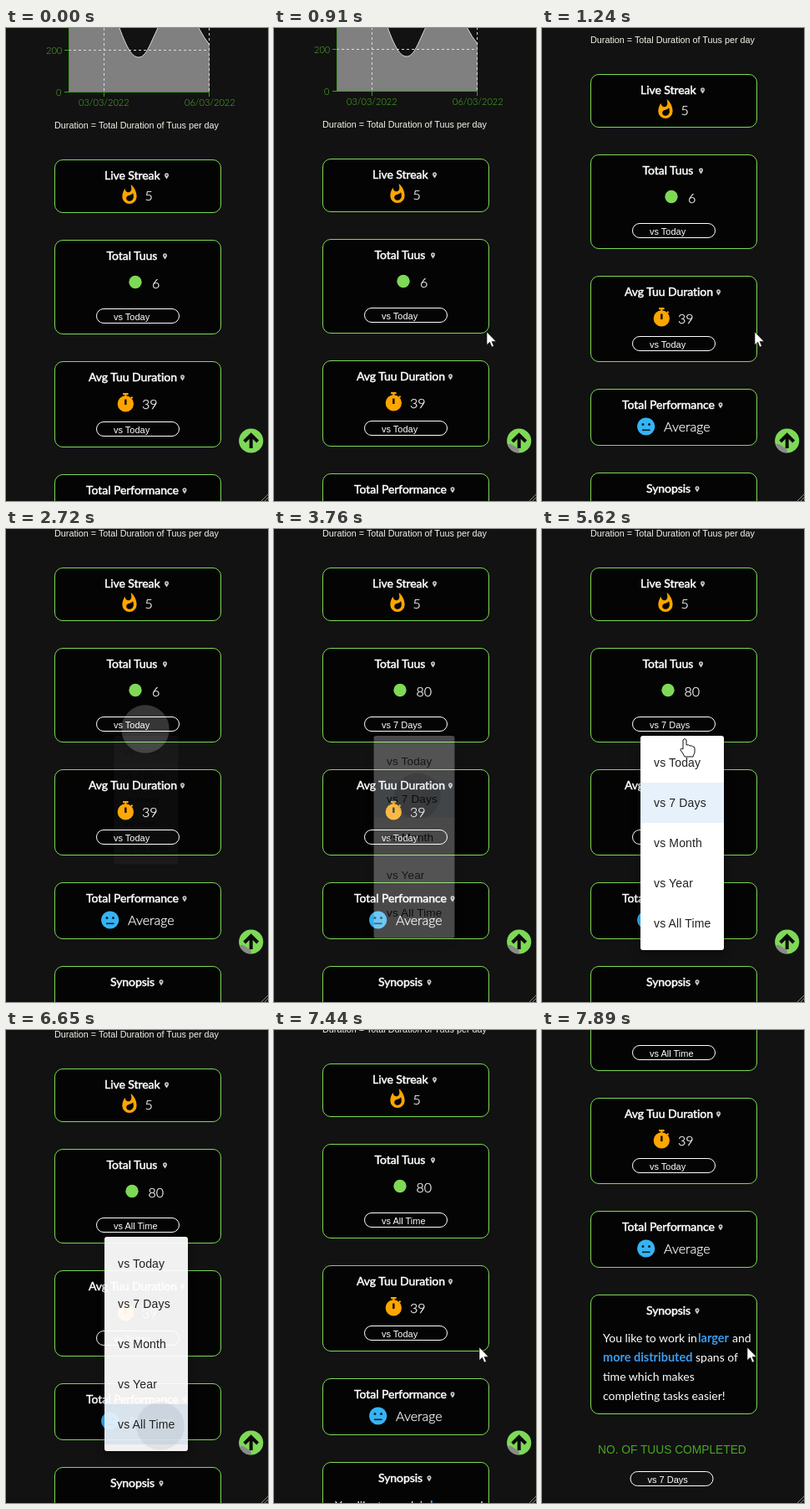
Recreate the animation shown at these times as an HTML page. Size 314 px wide and 565 px high, loop 8 s.

```html
<!DOCTYPE html>
<html lang="en">
<head>
<meta charset="utf-8">
<title>Stats scroll</title>
<style>
  html, body { margin: 0; width: 100%; height: 100%; overflow: hidden; background: #121212; }
  svg { display: block; width: 314px; height: 565px; }
  text { fill: #fff; white-space: pre; }
  .title { font: 14px Lato, sans-serif; letter-spacing: -.05px; stroke: #fff; stroke-width: .5px; }
  .value { font: 300 16px Lato, sans-serif; stroke: #fff; stroke-width: .25px; }
  .body { font: 14px Lato, sans-serif; }
  .strong { font: 700 14.5px Lato, sans-serif; fill: #3a9df0; }
  .axis { font: 300 11px Lato, sans-serif; fill: #4cba28; }
  .note { font: 10.8px "Liberation Sans", Arial, sans-serif; fill: #f4f4ea; }
  .pill { font: 11px "Liberation Sans", Arial, sans-serif; }
  .head { font: 13.75px "Liberation Sans", Arial, sans-serif; fill: #45a821; }
  .item { font: 14px "Liberation Sans", Arial, sans-serif; letter-spacing: .15px; fill: #212121; }
  #sheet { filter: drop-shadow(0 5px 6px rgba(0, 0, 0, .35)); }
</style>
</head>
<body>
<svg id="stage" viewBox="0 0 314 565"></svg>
<script>
const GREEN = '#7ed957', ORANGE = '#ffa500', LOOP = 8000;
const OPTIONS = ['vs Today', 'vs 7 Days', 'vs Month', 'vs Year', 'vs All Time'];

const text = (cls, x, y, s, id = '') => `<text class="${cls}" x="${x}" y="${y}" id="${id}">${s}</text>`;
const card = (y, h) =>
  `<rect x="58.5" y="${y + .5}" width="199" height="${h}" rx="9.5" fill="#040404" stroke="${GREEN}"/>`;
const pill = (x, y, label, id) =>
  `<rect x="${x + .5}" y="${y + .5}" width="99" height="17" rx="8.5" fill="none" stroke="#fff"/>` +
  text('pill', x + 21, y + 14, label, id);
const title = (x, pinX, y, s) => text('title', x, y, s) +
  `<path d="M${pinX} ${y - .5}c-1-2-2.5-3-2.5-4.800a2.500 2.500 0 0 1 5 0c0 1.800-1.500 2.800-2.500 4.800z" fill="#ccc"/>
   <circle cx="${pinX}" cy="${y - 5.3}" r="1" fill="#333"/>`;

const chart = `
  <path d="M75 0H136C145 24 151 35 159 35C168 35 173 18 182 0H231Q238 13 244 20V77H75Z" fill="#7f807f"/>
  <path d="M136 0C145 24 151 35 159 35C168 35 173 18 182 0M231 0Q238 13 244 20" fill="none" stroke="#ddd"/>
  <path d="M75 26.5H244M117.5 0V77M243.5 0V77" stroke="#ddd" stroke-dasharray="3 3"/>
  <path d="M75.5 0V76.5H244M70 26.5h5M70 76.5h5M117.5 77v5M243.5 77v5" fill="none" stroke="#3f9f20"/>` +
  text('axis', 48, 31, '200') + text('axis', 60, 81, '0') +
  text('axis', 87, 93, '03/03/2022') + text('axis', 214, 93, '06/03/2022');

const flame = `
  <path transform="translate(135 186.3) scale(1.08)" fill="${ORANGE}" d="M13.5.7s.7 2.600.7 4.800c0 2-1.300 3.700-3.400 3.700
    S7.200 7.500 7.200 5.500V5.100C5.200 7.500 4 10.600 4 14a8 8 0 0 0 16 0C20 8.600 17.400 3.800 13.500.7z
    M11.700 19c-1.800 0-3.200-1.400-3.200-3.100 0-1.600 1-2.800 2.800-3.200s3.600-1.200 4.600-2.500c.4 1.300.6 2.600.6 4
    0 2.600-2.100 4.800-4.800 4.800z"/>`;

const stopwatch = `
  <g transform="translate(130.5 435) scale(1.07)"><path fill="${ORANGE}" d="M9 1h6v2H9zM11 2h2v3h-2zM19 7.400l1.400-1.400
    -1.400-1.400-1.400 1.400z"/><circle cx="12" cy="13" r="9" fill="${ORANGE}"/>
  <path d="M12 8v6" stroke="#040404" stroke-width="2.2"/></g>`;

const face = `
  <circle cx="124.7" cy="578" r="10.6" fill="#35b4f5"/>
  <g fill="#06202e"><circle cx="121" cy="575.5" r="1.500"/><circle cx="128.5" cy="575.5" r="1.500"/>
  <rect x="120" y="581.5" width="9.5" height="1.6"/></g>`;

const page = chart +
  text('note', 58, 120, 'Duration = Total Duration of Tuus per day') +
  card(157, 63) + title(118, 192.5, 181, 'Live Streak') + flame + text('value', 166.5, 206, '5') +
  card(253, 112) + title(120.5, 190.5, 277, 'Total Tuus') +
  `<circle id="logo" cx="155" cy="303.5" r="7.700" fill="${GREEN}"/>` +
  text('value', 175, 311, '6', 'total') + pill(108, 335, '', 'choice') +
  card(398, 102) + title(99, 211.5, 422, 'Avg Tuu Duration') + stopwatch +
  text('value', 163, 455, '39') + pill(108, 470, OPTIONS[0]) +
  card(533, 67) + title(96, 214, 557, 'Total Performance') + face + text('value', 146, 584, 'Average') +
  card(633, 142) + title(125, 186, 657, 'Synopsis') +
  text('body', 73, 690, 'You like to work in') + text('strong', 187, 690, 'larger') + text('body', 228, 690, 'and') +
  text('strong', 73, 713, 'more distributed') + text('body', 184, 713, 'spans of') +
  text('body', 73, 736, 'time which makes') + text('body', 73, 759, 'completing tasks easier!') +
  text('head', 67, 823, 'NO. OF TUUS COMPLETED') + pill(105.5, 844, OPTIONS[1]);

const topButton = `
  <g id="top"><circle cx="293.7" cy="493" r="14.6" fill="${GREEN}"/>
  <path id="wedge" d="M279.6 497H284L293.700 503V507.600A14.600 14.600 0 0 1 279.600 497Z" fill="#8a8a8a"/>
  <path d="M293.7 502V486M285.700 494L293.700 486L301.700 494" fill="none" stroke="#0a0a0a" stroke-width="4"/></g>`;

const menu = `
  <g id="menu"><g id="sheet"><rect x="118" y="247" width="100" height="256" rx="3" fill="#fff"/></g>
  <rect id="selected" x="118" width="100" height="48" fill="#1976d2" fill-opacity=".1"/>
  <circle id="press"/>${OPTIONS.map((s, i) => text('item', 134, 284 + 48 * i, s)).join('')}</g>`;

const cursors = `
  <path id="arrow" d="M0 0V15.5L3.600 12.200L6 18L8.400 17L6 11.400H11Z" fill="#fff" stroke="#111" stroke-width=".6"/>
  <path id="hand" d="M-2 2Q0-1 2 2V8Q5 7 6 9Q9 8 9.500 10Q12 9.500 12 12V17Q11 19 10 22H0Q-2 18-5 14Q-5 11-2 13Z"
    fill="#fff" stroke="#111"/>`;

const grip = '<path d="M306 565L314 557M310 565L314 561" stroke="#8c8c84"/>';

document.getElementById('stage').innerHTML =
  `<g id="page">${page}</g>` + grip + topButton + '<circle id="tap"/>' + menu + cursors;

const el = id => document.getElementById(id);
const set = (id, attrs) => { for (const k in attrs) el(id).setAttribute(k, attrs[k]); };
const show = (id, on) => set(id, { visibility: on ? 'visible' : 'hidden' });
const clamp = v => Math.min(1, Math.max(0, v));

// cubic-bezier(.4, 0, .2, 1), solved by bisection
function ease(x) {
  let lo = 0, hi = 1, s = .5;
  for (let i = 0; i < 24; i++) {
    s = (lo + hi) / 2;
    const bx = 1.2 * s * (1 - s) ** 2 + .6 * s * s * (1 - s) + s ** 3;
    if (bx < x) lo = s; else hi = s;
  }
  return 3 * s * s * (1 - s) + s ** 3;
}
const tween = (t, start, length) => ease(clamp((t - start) / length));

// time, x, y, pointer until the next key: 0 none, 1 arrow, 2 hand
const TRACK = [
  [0, 280, 495, 0], [120, 280, 495, 1], [400, 255, 363, 1], [1810, 255, 363, 1], [2250, 167, 239, 2],
  [2560, 167, 239, 0], [3200, 167, 245, 2], [3450, 172, 323, 2], [3590, 172, 323, 0],
  [4200, 172, 323, 1], [4390, 171, 243, 2], [4470, 171, 243, 0], [5620, 171, 250, 2],
  [6000, 212, 515, 1], [6390, 185, 473, 2], [6520, 185, 473, 0], [6860, 190, 465, 1],
  [7010, 246, 379, 1], [LOOP, 246, 379, 1]
];
function drawCursor(t) {
  const i = TRACK.findIndex(k => k[0] > t), [t0, x0, y0, kind] = TRACK[i - 1], [t1, x1, y1] = TRACK[i];
  const p = tween(t, t0, t1 - t0);
  ['arrow', 'hand'].forEach((id, n) => {
    show(id, kind === n + 1);
    set(id, { transform: `translate(${x0 + (x1 - x0) * p} ${y0 + (y1 - y0) * p})` });
  });
}

function drawRipple(id, t, start, x, y, color, alpha) {
  const age = t - start, r = 10 + 19 * tween(age, 0, 260);
  set(id, { cx: x, cy: y, r, fill: color, 'fill-opacity': age < 0 ? 0 : alpha * clamp(1 - (age - 220) / 300) });
}

function drawMenu(t) {
  const [open, close] = t < 4000 ? [2688, 3622] : [4590, 6608];
  const closing = t >= close;
  const fade = tween(t, closing ? close : open, 299);
  const grow = tween(t, closing ? close + 100 : open, 199);
  const opacity = closing ? 1 - fade : fade, k = closing ? 1 - grow : grow;
  show('menu', t >= 2720 && opacity > 0);
  set('menu', {
    opacity,
    transform: `translate(168 247) scale(${.75 + .25 * k} ${.5625 + .4375 * k}) translate(-168 -247)`
  });
}

function draw() {
  const t = performance.now() % LOOP;
  const choice = t < 3622 ? 0 : t < 6608 ? 1 : 4;
  const scroll = 111 * tween(t, 880, 540) + 206 * tween(t, 7390, 500);
  set('page', { transform: `translate(0 ${-Math.round(scroll)})` });
  el('choice').textContent = OPTIONS[choice];
  el('total').textContent = choice ? 80 : 6;
  set('total', { x: choice ? 170.5 : 175 });
  set('logo', { cx: choice ? 151 : 155 });
  set('selected', { y: 255 + 48 * choice });
  show('top', t < 7600);
  set('wedge', { opacity: t < 260 ? 0 : 1 });
  show('tap', t >= 2720);
  if (t < 4000) {
    drawRipple('tap', t, 2500, 167, 239, '#fff', .2);
    drawRipple('press', t, 3540, 172, 323, '#000', .14);
  } else {
    drawRipple('tap', t, 4470, 171, 243, '#fff', .08);
    drawRipple('press', t, 6430, 185, 473, '#000', .06);
  }
  drawMenu(t);
  drawCursor(t);
  requestAnimationFrame(draw);
}
draw();
</script>
</body>
</html>
```
